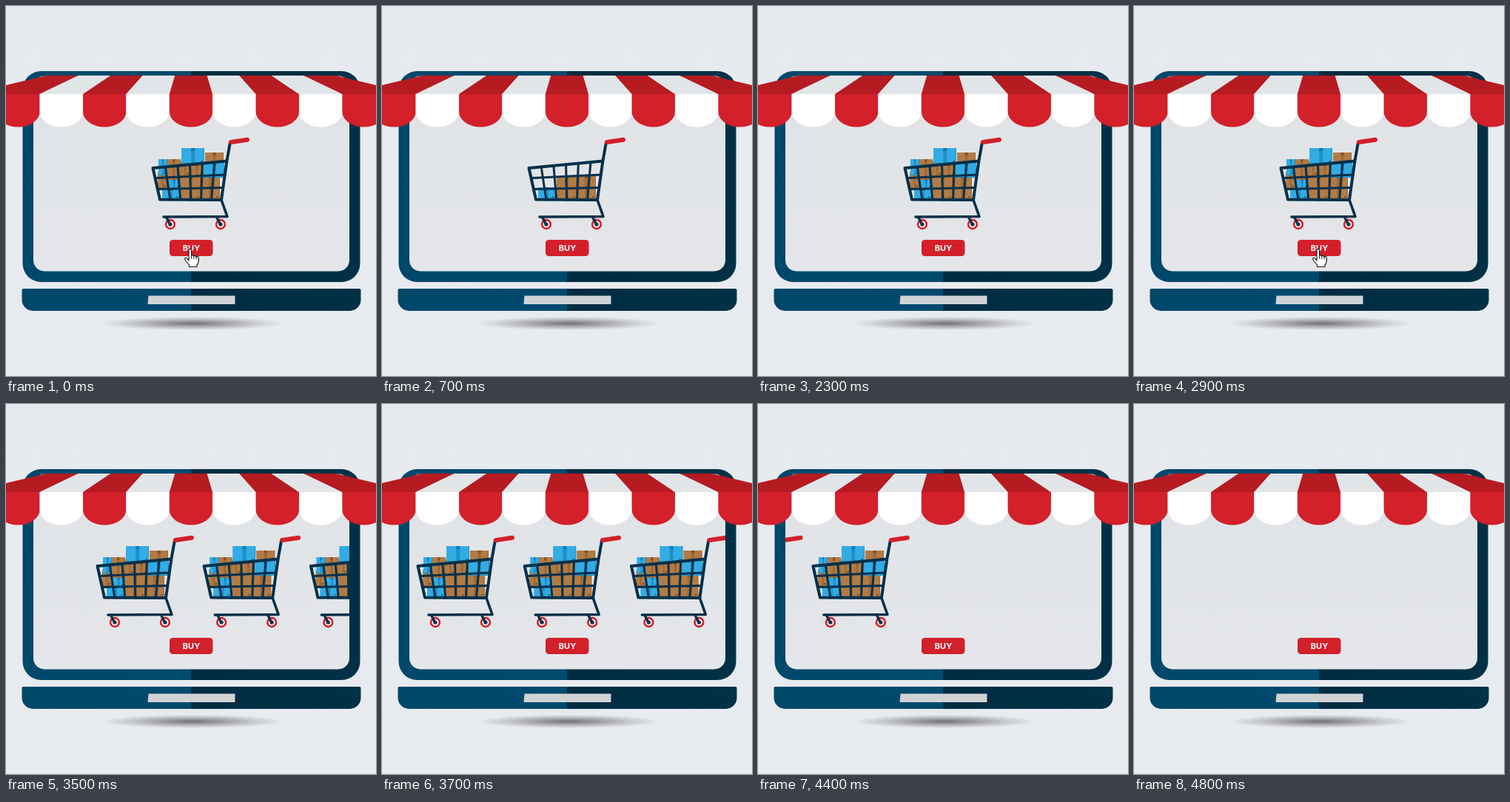
An HTML page with a canvas that plays this animation: 500 px wide and 500 px high, repeating every 7800 ms.

```html
<!DOCTYPE html>
<html lang="en">
<head>
<meta charset="utf-8">
<title>Shopping cart</title>
<style>
html, body { margin: 0; width: 100%; height: 100%; overflow: hidden; background: #e7eaee; }
canvas { display: block; width: 100vw; height: 100vh; }
</style>
</head>
<body>
<canvas id="stage" width="500" height="500"></canvas>
<script>
const ctx = document.getElementById('stage').getContext('2d');

const LOOP = 7800, STEP = 100;
const FILL = 500, POINT = 2500, RIDE = 3300, GONE = 4800;
const GAP = 144.2, SPEED = 0.375;
const NAVY = '#05304a', RED = '#d3202a', DARK_RED = '#b51b21';
const BLUE = ['#32ace4', '#2190c8', '#1878ac'];
const BROWN = ['#b27b45', '#9c6938', '#80532a'];

// Groups of boxes in the order they drop in: x, y, width, height, colours
const groups = [
  [[236, 230, 27, 31, BROWN], [263, 229, 26, 32, BROWN]],
  [[211, 245, 24, 16, BLUE]],
  [[218, 234, 18, 13, BLUE]],
  [[205, 224, 13, 22, BROWN]],
  [[267, 212, 28, 20, BLUE]],
  [[235, 210, 14, 20, BROWN], [249, 213, 18, 17, BROWN]],
  [[217, 207, 19, 28, BROWN]],
  [[206, 207, 12, 22, BLUE]],
  [[269, 198, 25, 14, BROWN]],
  [[237, 192, 31, 21, BLUE]]
];

function shape(points, fill) {
  ctx.beginPath();
  points.forEach(p => ctx.lineTo(p[0], p[1]));
  ctx.closePath();
  ctx.fillStyle = fill;
  ctx.fill();
}

function line(points, width, color) {
  ctx.beginPath();
  points.forEach(p => ctx.lineTo(p[0], p[1]));
  ctx.lineWidth = width;
  ctx.strokeStyle = color;
  ctx.stroke();
}

function disc(x, y, r, fill) {
  ctx.beginPath();
  ctx.arc(x, y, r, 0, 7);
  ctx.fillStyle = fill;
  ctx.fill();
}

function rounded(x, y, w, h, r, fill) {
  ctx.beginPath();
  ctx.roundRect(x, y, w, h, r);
  ctx.fillStyle = fill;
  ctx.fill();
}

function blend(x0, y0, x1, y1, ...stops) {
  const g = ctx.createLinearGradient(x0, y0, x1, y1);
  stops.forEach(([at, color]) => g.addColorStop(at, color));
  return g;
}

function laptop() {
  ctx.fillStyle = blend(0, 0, 0, 500, [0, '#e6e9ee'], [1, '#e8ebef']);
  ctx.fillRect(0, 0, 500, 500);

  ctx.save();
  ctx.translate(252, 429);
  ctx.scale(1, 0.075);
  const shade = ctx.createRadialGradient(0, 0, 0, 0, 0, 125);
  shade.addColorStop(0, 'rgba(70,70,75,.75)');
  shade.addColorStop(0.5, 'rgba(95,95,100,.4)');
  shade.addColorStop(1, 'rgba(120,120,125,0)');
  disc(0, 0, 125, shade);
  ctx.restore();

  const body = blend(22, 0, 479, 0, [0, '#00486b'], [0.5, '#004a6e'], [0.5, '#002c40'], [1, '#003146']);
  rounded(22.5, 88, 456, 285, 25, body);
  rounded(37, 94.5, 427, 264, 15, blend(0, 95, 0, 359, [0, '#e0e3e6'], [1, '#e4e6e9']));
  rounded(21.5, 382, 458, 30, [2, 2, 15, 15], body);
  shape([[192.5, 391.5], [309.5, 391.5], [309.5, 403], [191.5, 403]], '#d0d3d6');
}

function awning() {
  const top = 94, fold = 119;
  for (let i = -4; i <= 4; i++) {
    const red = i % 2 === 0;
    const edge = (k, w) => 250 + (i + k) * w;
    let left = edge(-0.5, 58.4), right = edge(0.5, 58.4);
    shape([
      [edge(-0.5, 43.5), top], [edge(0.5, 43.5), top],
      [i === 4 ? 550 : right, fold], [i === -4 ? -50 : left, fold]
    ], red ? DARK_RED : '#e1e5e8');
    ctx.beginPath();
    ctx.moveTo(left, fold);
    ctx.lineTo(right, fold);
    ctx.lineTo(right, 143);
    ctx.ellipse((left + right) / 2, 143, 29.2, 20.5, 0, 0, Math.PI);
    ctx.closePath();
    ctx.fillStyle = red ? RED : '#fff';
    ctx.fill();
  }
}

function box(x, y, w, h, [face, side, tape]) {
  ctx.fillStyle = face;
  ctx.fillRect(x, y, w, h);
  ctx.fillStyle = side;
  ctx.fillRect(x + w - 1, y, 1, h);
  ctx.fillRect(x, y + h - 1, w, 1);
  ctx.fillRect(x + w * 0.43, y, w * 0.16, h);
  ctx.fillStyle = tape;
  ctx.fillRect(x + w * 0.43, y, w * 0.16, Math.min(4, h / 4));
  ctx.fillRect(x + w - 5, y + h - 4, 3, 2);
}

function wheel(x) {
  disc(x, 295, 7.2, RED);
  disc(x, 295, 4.6, '#f3f4f5');
  disc(x, 295, 2.6, NAVY);
}

function cart(dx, filled) {
  ctx.save();
  ctx.translate(dx, 0);
  ctx.lineCap = ctx.lineJoin = 'round';
  groups.slice(0, filled).forEach(g => g.forEach(b => box(...b)));

  wheel(222);
  wheel(290);
  line([[217, 286], [221.5, 295]], 3.5, NAVY);
  line([[285, 286], [289.5, 295]], 3.5, NAVY);
  line([[213, 285], [299, 284.5], [291, 262]], 3.6, NAVY);

  // Basket
  line([[303, 184], [298.5, 209], [291, 262], [208, 261.5], [198.5, 219], [298.5, 209.5]], 4, NAVY);
  line([[202, 232.5], [296, 228]], 3, NAVY);
  line([[205, 247.5], [293.5, 245.5]], 3, NAVY);
  for (let i = 1; i < 6; i++) {
    line([[198.5 + i * 16.7, 219 - i * 1.6], [208 + i * 13.9, 262]], 3, NAVY);
  }
  line([[304, 184], [326, 180.8]], 6, RED);
  ctx.restore();
}

function button() {
  rounded(221, 316, 58.5, 22, 4.5, RED);
  ctx.fillStyle = '#fff';
  ctx.font = '700 11px Inter, sans-serif';
  ctx.textAlign = 'center';
  ctx.textBaseline = 'alphabetic';
  ctx.fillText('BUY', 250.5, 330.7);
}

function hand(dx) {
  ctx.save();
  ctx.translate(241 + dx, 328);
  ctx.lineJoin = ctx.lineCap = 'round';
  const path = new Path2D('M6 16V2Q6 .4 7.8 .4T9.6 2V9Q11 7.8 12.6 9.6Q14.6 8.6 16 10.6Q19 9.8 19.3 13V17Q19 20 17 22V24.5H6.5V22L1 15Q0 13 1.6 12.5T4.2 13.8Z');
  ctx.fillStyle = '#fff';
  ctx.fill(path);
  ctx.lineWidth = 1.2;
  ctx.strokeStyle = '#1b1b1b';
  ctx.stroke(path);
  line([[9.6, 9], [9.6, 13]], 1, '#1b1b1b');
  line([[12.8, 10], [12.8, 13.5]], 1, '#1b1b1b');
  line([[16, 11], [16, 14]], 1, '#1b1b1b');
  ctx.restore();
}

function carts(t) {
  if (t >= GONE) return;
  ctx.save();
  ctx.beginPath();
  ctx.rect(37, 95, 427, 264);
  ctx.clip();
  if (t >= RIDE) {
    for (let i = 0; i < 3; i++) cart(i * GAP - (t - RIDE) * SPEED, groups.length);
  } else {
    const filled = t < STEP ? groups.length : Math.floor((t - FILL) / 200) + 1;
    cart(0, Math.max(0, filled));
  }
  ctx.restore();
}

function draw(now) {
  const t = Math.floor((now % LOOP) / STEP) * STEP;
  laptop();
  carts(t);
  awning();
  button();
  if (t < STEP) hand(0);
  else if (t >= POINT && t < RIDE) hand(Math.min(0, (t - POINT) * 0.13 - 52));
}

const start = performance.now();
function tick() {
  draw(performance.now() - start);
  requestAnimationFrame(tick);
}
tick();
</script>
</body>
</html>
```
